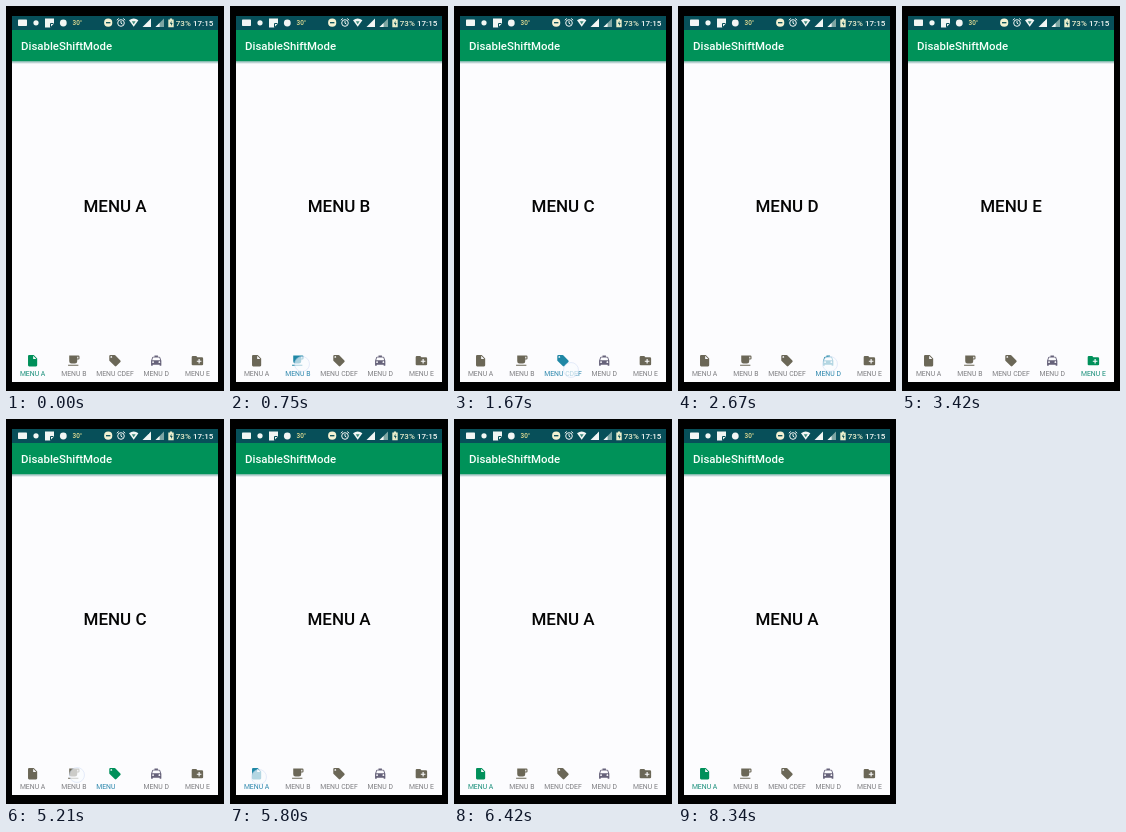
These frames come from a looping animation (218x385 px, 9.34 s). An HTML page:

```html
<!DOCTYPE html>
<html lang="en">
<head>
<meta charset="utf-8">
<title>DisableShiftMode</title>
<style>
  html, body { margin: 0; width: 100%; height: 100%; overflow: hidden; background: #000; }
  svg { display: block; width: 100vw; height: 100vh; }
  text { font-family: Roboto, sans-serif; }
  .status text { font-size: 8px; font-weight: 500; }
  .label { font-size: 6.86px; }
</style>
</head>
<body>
<svg viewBox="0 0 218 385">
  <defs>
    <linearGradient id="shade" x2="0" y2="1">
      <stop stop-color="#8fb5b5"/>
      <stop offset="1" stop-color="#fcfcfe"/>
    </linearGradient>
  </defs>
  <rect width="218" height="385"/>
  <rect x="6" y="10" width="206" height="366" fill="#fcfcfe"/>
  <rect x="6" y="10" width="206" height="14" fill="#074f59"/>
  <rect x="6" y="24" width="206" height="31.5" fill="#009259"/>
  <rect x="6" y="55.5" width="206" height="2.5" fill="url(#shade)"/>

  <g class="status" fill="#f2f6f4">
    <rect x="12" y="13.5" width="9" height="6.5" rx=".7"/>
    <circle cx="30" cy="16.8" r="2.6"/>
    <path d="M39 12.5h9v5l-4 4h-5z"/>
    <path d="M44.5 21v-3.5h3" fill="none" stroke="#074f59"/>
    <circle cx="57.3" cy="17" r="3.4"/>
    <text x="66.5" y="19.2" fill="#e8e094" style="font-size:6.4px">30°</text>
    <circle cx="102.2" cy="16.7" r="4.1" fill="#f3f1d2"/>
    <path d="M100 16.7h4.4" stroke="#074f59" stroke-width="1.3"/>
    <g fill="none" stroke="#f2f6f4">
      <circle cx="115" cy="17" r="3.3"/>
      <path d="M115 15v2.2l1.5 1M110.8 14.2l2-1.7M119.2 14.2l-2-1.7"/>
    </g>
    <path d="M123 14.2q4.7-3.6 9.4 0l-4.7 6.6z"/>
    <path id="wifi" d="M125.8 15.2h3.8l-1.9 3z"/>
    <path d="M145 12.5v8.5h-8.5z"/>
    <path d="M158 12.5v8.5h-8.5z" fill="#7da5a3"/>
    <path d="M153.6 16.9v4.1h-4.1z"/>
    <path d="M162.3 13.5h1.6v-1h2.2v1h1.6v7.8h-5.4z" fill="#e9edcb"/>
    <path d="M165.4 14.8l-1.5 2.9h1.2v2.4l1.5-3h-1.2z" fill="#074f59"/>
    <text x="169.8" y="19.7" fill="#e9edcb">73%</text>
    <text x="187" y="19.7">17:15</text>
  </g>

  <text x="15" y="44" fill="#f6fffa" font-size="11.44" font-weight="500">DisableShiftMode</text>
  <text id="page" x="109" y="206" fill="#050505" font-size="17" font-weight="500" text-anchor="middle"></text>
  <g id="nav"></g>
  <circle id="touch" r="7.5" fill="#fafcff" stroke="#cbd9f2" stroke-width=".7"/>
</svg>
<script>
const LOOP = 9340;
const SELECT_DELAY = 180;
const GREEN = '#00905a', BLUE = '#1f87a5', GREY = '#6b6757';

const tabs = [
  { name: 'A', label: 'MENU A',
    icon: 'M6 2Q4 2 4 4V20Q4 22 6 22H18Q20 22 20 20V8L14 2zM13 9V3.5L18.5 9z' },
  { name: 'B', label: 'MENU B',
    icon: 'M20 3H4V13Q4 17 8 17H14Q18 17 18 13V10H20Q22 10 22 8V5Q22 3 20 3zM20 8H18V5H20zM2 21H20V19H2z' },
  { name: 'C', label: 'MENU CDEF',
    icon: 'M21.4 11.6L12.4 2.6Q11.8 2 11 2H4Q2 2 2 4V11Q2 11.8 2.6 12.4L11.6 21.4Q13 22.6 14.4 21.4L21.4 14.4Q22.6 13 21.4 11.6zM5.5 7a1.5 1.5 0 1 1 .01 0z' },
  { name: 'D', label: 'MENU D', grey: '#66627a',
    icon: 'M18.9 6Q18.5 5 17.5 5H15V3H9V5H6.5Q5.5 5 5.1 6L3 12V20Q3 21 4 21H5Q6 21 6 20V19H18V20Q18 21 19 21H20Q21 21 21 20V12zM6.5 16a1.5 1.5 0 1 1 .01 0zM17.5 16a1.5 1.5 0 1 1 .01 0zM5 11L6.5 6.5H17.5L19 11z' },
  { name: 'E', label: 'MENU E',
    icon: 'M20 6H12L10 4H4Q2 4 2 6V18Q2 20 4 20H20Q22 20 22 18V8Q22 6 20 6zM19 14H16V17H14V14H11V12H14V9H16V12H19z' }
];

// Each tap: time, tab, touch point; `short` leaves only the first word lit.
const taps = [
  { at: 460, tab: 1, x: 72, y: 358 },
  { at: 1420, tab: 2, x: 117, y: 364 },
  { at: 2420, tab: 3, x: 152, y: 358 },
  { at: 2820, tab: 4, x: 193, y: 358 },
  { at: 3670, tab: 3, x: 152, y: 358 },
  { at: 4380, tab: 2, x: 111, y: 356, short: true },
  { at: 5130, tab: 1, x: 71, y: 356 },
  { at: 5520, tab: 0, x: 29, y: 358 }
];

const $ = id => document.getElementById(id);
const page = $('page'), touch = $('touch'), wifi = $('wifi');

function add(tag, attrs) {
  const el = document.createElementNS('http://www.w3.org/2000/svg', tag);
  for (const key in attrs) el.setAttribute(key, attrs[key]);
  return $('nav').appendChild(el);
}

tabs.forEach((tab, i) => {
  const x = 26.6 + i * 41.2, s = 0.572;
  tab.shape = add('path', {
    d: tab.icon, 'fill-rule': 'evenodd',
    transform: `translate(${x - 12 * s} ${354.7 - 12 * s}) scale(${s})`
  });
  tab.text = add('text', { class: 'label', x, y: 370, 'text-anchor': 'middle' });
  const [first, rest] = tab.label.split(' ');
  tab.text.textContent = first + ' ';
  tab.rest = document.createElementNS('http://www.w3.org/2000/svg', 'tspan');
  tab.rest.textContent = rest;
  tab.text.append(tab.rest);
});

function draw(t) {
  const chosen = taps.filter(p => t >= p.at + SELECT_DELAY).pop();
  const active = chosen ? chosen.tab : 0;
  const fresh = chosen && t < chosen.at + 340;
  const short = chosen && chosen.short;

  page.textContent = 'MENU ' + tabs[active].name;
  tabs.forEach((tab, i) => {
    const on = i === active;
    tab.shape.setAttribute('fill', on ? (fresh ? BLUE : GREEN) : tab.grey || GREY);
    tab.text.setAttribute('fill', on ? (fresh || short ? '#2b86ac' : '#168d78') : '#7d7d80');
    tab.rest.setAttribute('opacity', on && short ? 0 : 1);
  });

  const tap = taps.filter(p => t >= p.at).pop();
  const age = tap ? t - tap.at : LOOP;
  touch.setAttribute('opacity', 0.68 * Math.max(0, Math.min(1, (480 - age) / 200)));
  if (tap) {
    touch.setAttribute('cx', tap.x);
    touch.setAttribute('cy', tap.y);
  }
  wifi.setAttribute('fill', t >= 7340 && t < 8340 ? '#9cc5bd' : '#3c8a7c');
}

const start = performance.now();
function tick() {
  draw((performance.now() - start) % LOOP);
  requestAnimationFrame(tick);
}
tick();
</script>
</body>
</html>
```
